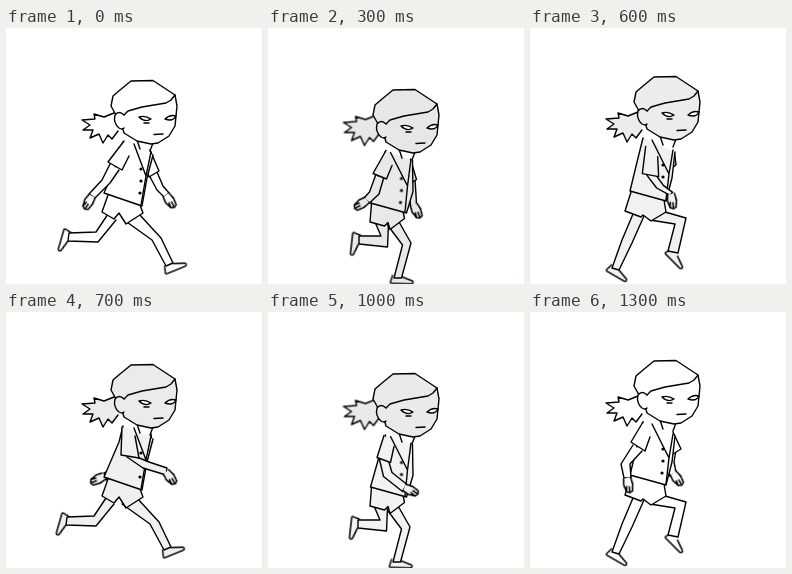
Animation of 256 by 256 pixels, one loop 1.4 s. Source, as an HTML page without scripts:

```html
<!DOCTYPE html>
<html lang="en">
<head>
<meta charset="utf-8">
<title>Running girl</title>
<style>
html, body { margin: 0; width: 100%; height: 100%; overflow: hidden; background: #fff; }
svg { display: block; width: 100vw; height: 100vh; }
.fig { stroke: #000; stroke-width: 1.4; stroke-linejoin: round; stroke-linecap: round; }
.line { fill: none; }

/* Every move snaps on a 100 ms beat; steps(2) supplies the in-between pose. */
.fig, .fig * { animation: 1.4s steps(2) infinite; }
.fig { animation-name: tone; }
.head { animation-name: bob, face; animation-duration: .7s, 1.4s; }
.tail { animation-name: sway, face; animation-duration: .7s, 1.4s; }
.shirt { animation-name: shirt; animation-duration: .7s; }
.collar { animation-name: collar; animation-duration: .7s; }
.buttons { animation-name: buttons; animation-duration: .7s; }
.shorts { animation-name: shorts; animation-duration: .7s; }
.legs { animation-name: shift; }
.leg { animation-name: leg; }
.foot { animation-name: foot; }
.far .leg, .far .foot { animation-delay: -.7s; }
.arm { animation-name: arm; }
.hand { animation-name: hand; }
.sleeve { animation-name: sleeve; }
.far .arm { animation-name: far-arm; }
.far .hand { animation-name: far-hand; }
.far .sleeve { animation-name: far-sleeve; }

@keyframes tone {
  0%, 100% { fill: #fff; }
  14.28% { fill: #dedede; }
  28.57% { fill: #f3f3f3; animation-timing-function: steps(3); }
  50% { fill: #f0f0f0; }
  64.28% { fill: #fcfcfc; }
  78.57% { fill: #e7e7e7; }
  92.85% { fill: #fff; }
}
@keyframes face {
  0%, 100% { fill: #fff; }
  14.28% { fill: #dedede; }
  28.57% { fill: #efefef; animation-timing-function: steps(3); }
  50% { fill: #ebebeb; }
  64.28% { fill: #efefef; }
  78.57% { fill: #e5e5e5; }
  92.85% { fill: #fff; }
}
@keyframes bob {
  0%, 100% { transform: translate(0, 0); }
  28.57% { transform: translate(0, 6px); }
  57.14% { transform: translate(0, 12px); }
  85.71% { transform: translate(-1px, -4px); animation-timing-function: steps(1); }
}
@keyframes sway {
  0%, 100% { transform: translate(0, 0); }
  28.57% { transform: translate(-1px, 1px); }
  57.14% { transform: translate(0, 4px); }
  85.71% { transform: translate(0, -1px); animation-timing-function: steps(1); }
}
@keyframes shirt {
  0%, 100% { d: path("M117 114 L113 130 L98 165 L136 178 L141 150 L147 127"); }
  28.57% { d: path("M119 120 L113 138 L101 172 L136 182 L143 162 L142 129"); }
  57.14% { d: path("M116 126 L109 152 L104 178 L141 188 L147 165 L147 136"); }
  85.71% { d: path("M113 110 L108 130 L100 163 L136 173 L142 150 L145 124"); animation-timing-function: steps(1); }
}
@keyframes collar {
  0%, 100% { d: path("M128 116 L140 148 L145 124 M140 148 L135 177"); }
  28.57% { d: path("M124 120 L139 156 L142 129 M139 156 L135 181"); }
  57.14% { d: path("M121 129 L140 160 L144 133 M140 160 L139 187"); }
  85.71% { d: path("M122 112 L139 146 L143 122 M139 146 L136 172"); animation-timing-function: steps(1); }
}
@keyframes buttons {
  0%, 100% { transform: translate(0, 0); }
  28.57% { transform: translate(-1px, 5px); }
  57.14% { transform: translate(-2px, 14px); }
  85.71% { transform: translate(-2px, -4px); animation-timing-function: steps(1); }
}
@keyframes shorts {
  0%, 100% { d: path("M102 167 L96 184 L108 191 L113 185 L120 196 L137 185 L134 177"); }
  28.57% { d: path("M102 172 L101 192 L116 195 L119 191 L123 199 L135 189 L134 180"); }
  57.14% { d: path("M105 178 L103 196 L117 201 L121 198 L121 204 L138 192 L136 186"); }
  85.71% { d: path("M101 164 L95 183 L111 189 L113 187 L121 193 L136 184 L134 172"); animation-timing-function: steps(1); }
}
@keyframes shift {
  0%, 92.85%, 100% { transform: translate(0, 0); animation-timing-function: steps(1); }
  50% { transform: translate(-2px, 0); animation-timing-function: steps(1); }
  57.14% { transform: translate(-1px, 0); animation-timing-function: steps(1); }
}
@keyframes leg {
  0%, 100% { d: path("M118 192 L146 212 L160 238 L167 235 L155 210 L133 186"); }
  14.28% { d: path("M122 196 L138 215 L136 250 L143 250 L147 213 L133 190"); }
  28.57% { d: path("M117 198 L131 219 L116 250 L124 250 L139 217 L128 196"); }
  42.85% { d: path("M103 186 L92 212 L82 240 L89 242 L102 215 L114 188"); animation-timing-function: steps(1); }
  50% { d: path("M102 186 L90 204 L63 205 L62 213 L92 214 L110 192"); }
  64.28% { d: path("M106 190 L104 209 L79 210 L78 218 L108 220 L117 194"); }
  78.57% { d: path("M108 198 L122 207 L103 206 L104 214 L131 218 L124 198"); }
  92.85% { d: path("M120 192 L145 196 L138 223 L148 225 L156 190 L135 184"); animation-timing-function: steps(1); }
}
@keyframes foot {
  0%, 100% { transform: translate(164px, 238px) rotate(-22deg); }
  14.28% { transform: translate(140px, 249px) rotate(0deg); }
  28.57% { transform: translate(119px, 250px) rotate(3deg); }
  42.85% { transform: translate(85px, 241px) rotate(30deg); animation-timing-function: steps(1); }
  50% { transform: translate(62px, 209px) rotate(106deg); }
  64.28% { transform: translate(78px, 214px) rotate(108deg); }
  78.57% { transform: translate(102px, 210px) rotate(85deg); }
  92.85% { transform: translate(144px, 226px) rotate(45deg); animation-timing-function: steps(1); }
}
@keyframes arm {
  0%, 100% { d: path("M104 136 L96 152 L83 166 L89 170 L104 155 L113 142"); }
  14.28% { d: path("M106 143 L97 160 L92 164 L97 169 L108 160 L113 147"); }
  28.57% { d: path("M109 152 L106 168 L100 176 L106 181 L114 172 L118 154"); animation-timing-function: steps(3); }
  50% { d: path("M121 145 L137 156 L160 163 L161 156 L143 150 L131 145"); }
  64.28% { d: path("M115 146 L123 161 L144 176 L148 169 L131 157 L124 147"); }
  78.57% { d: path("M108 149 L108 168 L125 183 L130 176 L117 164 L118 154"); }
  92.85% { d: path("M103 133 L91 152 L94 166 L101 166 L100 152 L112 139"); animation-timing-function: steps(1); }
}
@keyframes hand {
  0%, 100% { transform: translate(86px, 168px) rotate(115deg); }
  14.28% { transform: translate(95px, 166px) rotate(148deg); }
  28.57% { transform: translate(103px, 178px) rotate(135deg); animation-timing-function: steps(3); }
  50% { transform: translate(160px, 160px) rotate(48deg); }
  64.28% { transform: translate(146px, 172px) rotate(23deg); }
  78.57% { transform: translate(127px, 179px) rotate(20deg); }
  92.85% { transform: translate(97px, 166px) rotate(75deg); animation-timing-function: steps(1); }
}
@keyframes sleeve {
  0%, 100% { d: path("M118 113 L102 134 L116 142 L123 128"); }
  14.28% { d: path("M121 120 L103 140 L117 148 L123 137"); }
  28.57% { d: path("M115 125 L107 151 L120 154 L125 138"); animation-timing-function: steps(3); }
  50% { d: path("M116 115 L115 143 L133 146 L129 124"); }
  64.28% { d: path("M115 121 L112 144 L126 147 L127 129"); }
  78.57% { d: path("M117 126 L106 147 L119 154 L125 140"); }
  92.85% { d: path("M113 110 L101 130 L115 139 L120 125"); animation-timing-function: steps(1); }
}
@keyframes far-arm {
  0%, 100% { d: path("M143 147 L151 162 L158 169 L163 165 L157 158 L151 144"); }
  14.28% { d: path("M143 158 L144 167 L148 177 L154 174 L151 166 L150 153"); }
  28.57% { d: path("M137 150 L139 168 L137 180 L143 180 L145 168 L144 150"); animation-timing-function: steps(3); }
  50% { d: path("M130 125 L112 155 L98 161 L100 168 L118 160 L138 130"); }
  64.28% { d: path("M130 135 L112 160 L103 167 L107 173 L118 164 L138 138"); }
  78.57% { d: path("M130 140 L124 160 L128 172 L134 170 L132 158 L138 142"); }
  92.85% { d: path("M136 140 L136 152 L140 164 L146 160 L144 150 L146 138"); animation-timing-function: steps(1); }
}
@keyframes far-hand {
  0%, 100% { transform: translate(160px, 167px) rotate(52deg); }
  14.28% { transform: translate(151px, 175px) rotate(50deg); }
  28.57% { transform: translate(140px, 178px) rotate(70deg); animation-timing-function: steps(3); }
  50% { transform: translate(98px, 164px) rotate(148deg); }
  64.28% { transform: translate(104px, 170px) rotate(150deg); }
  78.57% { transform: translate(130px, 168px) rotate(70deg); }
  92.85% { transform: translate(143px, 161px) rotate(50deg); animation-timing-function: steps(1); }
}
@keyframes far-sleeve {
  0%, 100% { d: path("M144 122 L153 143 L143 149 L138 130"); }
  14.28% { d: path("M141 129 L151 153 L142 158 L136 138"); }
  28.57% { d: path("M144 134 L146 150 L138 156 L136 140"); animation-timing-function: steps(3); }
  50% { d: path("M145 122 L146 130 L136 140 L132 124"); }
  64.28% { d: path("M140 130 L140 145 L130 148 L130 132"); }
  78.57% { d: path("M143 136 L144 150 L134 152 L134 138"); }
  92.85% { d: path("M143 120 L151 137 L143 142 L136 128"); animation-timing-function: steps(1); }
}
</style>
</head>
<body>
<svg viewBox="0 0 256 256">
  <defs>
    <path id="shoe" d="M-5 -2 L-7 5 Q-7 6 -6 6 H14 Q17 5 15 3 L4 -1"/>
    <path id="palm" d="M0 -3.5 L7 -4 L14 -2 L15 1 L13 4 L6 5 L0 3.5 M15 1 L9 0 M13 4 L8 2.5"/>
  </defs>
  <g class="fig">
    <g class="far">
      <path class="arm"/>
      <g class="hand"><use href="#palm"/></g>
      <path class="sleeve"/>
    </g>
    <g class="legs">
      <g class="far">
        <g class="foot"><use href="#shoe"/></g>
        <path class="leg"/>
      </g>
      <g class="near">
        <g class="foot"><use href="#shoe"/></g>
        <path class="leg"/>
      </g>
    </g>
    <path class="shorts"/>
    <path class="shirt"/>
    <path class="collar line"/>
    <g class="buttons" fill="#000" stroke="none">
      <circle cx="135" cy="141" r="1.6"/>
      <circle cx="135" cy="153" r="1.6"/>
      <circle cx="134" cy="165" r="1.6"/>
    </g>
    <g class="near">
      <path class="arm"/>
      <g class="hand"><use href="#palm"/></g>
      <path class="sleeve"/>
    </g>
    <path class="tail" d="M108 85 L98 89 L88 86 L89 91 L76 92 L84 97 L77 102 L87 102 L84 110 L93 106 L97 115 L102 107 L106 111 L112 103"/>
    <g class="head">
      <path d="M131 112 L134 121 M147 115 L144 123"/>
      <path d="M169 67 L171 78 L169 98 L163 108 L152 115 L145 116 L131 113 L118 105 L112 84 L130 66 Z"/>
      <path d="M110 87 L105 78 L107 68 L114 62 L125 53 L147 52.5 L169 67 L165 72 L160 75 L136 79 L122 83 L118 87"/>
      <path d="M118 87 Q113 82 109 87 Q107 95 113 100 Q116 102 118 100"/>
      <g fill="#fff">
        <path d="M133 89 Q139 87 145 91 Q139 95 133 89 Z"/>
        <path d="M159 91 Q164 86 170 88 Q167 94 159 91 Z"/>
      </g>
      <path class="line" d="M138 95 L143 95 M148 106.5 L157 106"/>
    </g>
  </g>
</svg>
</body>
</html>
```
